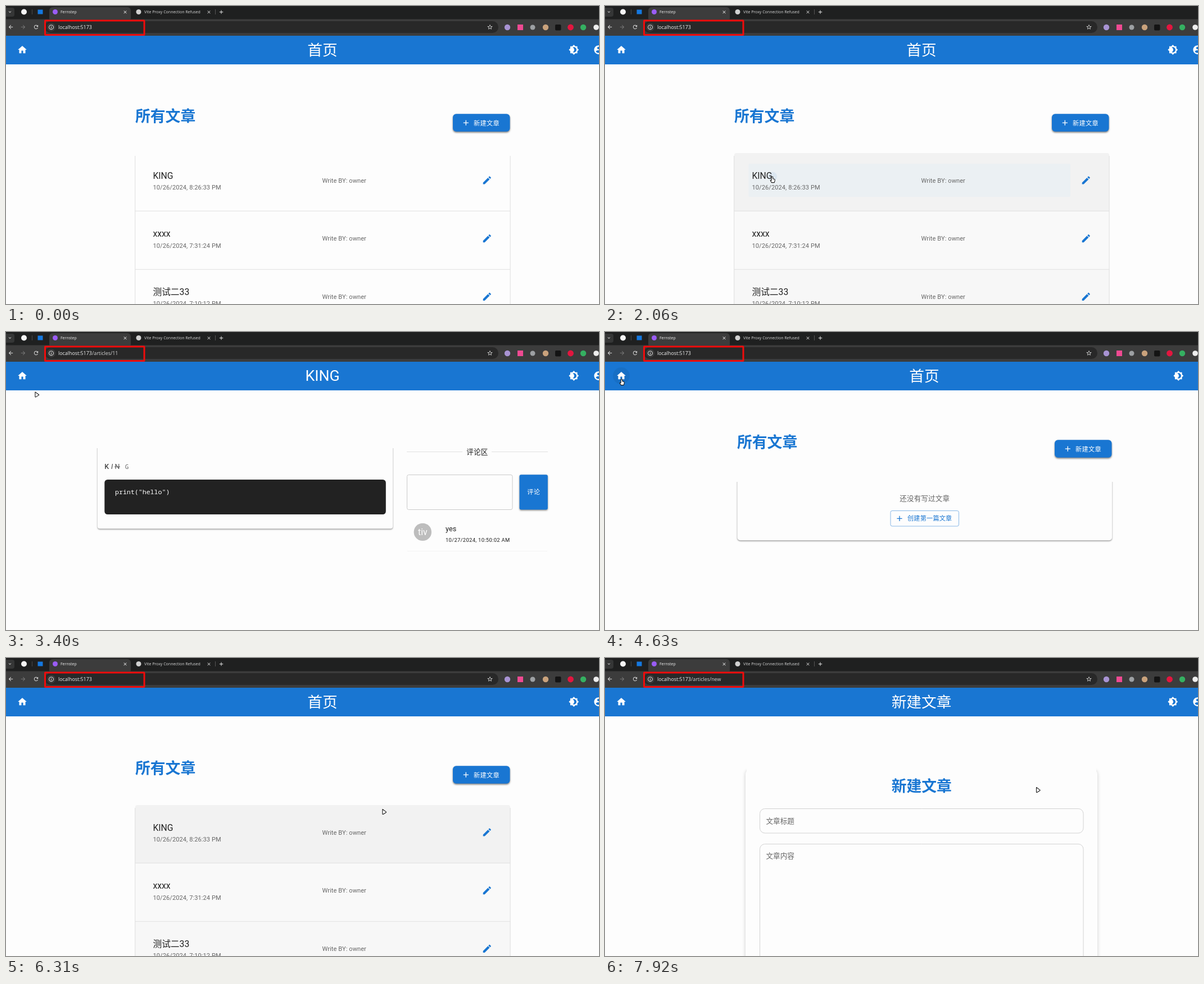
Animation of 1055 by 531 pixels, one loop 8 s. Source, as an HTML page with a canvas:

```html
<!DOCTYPE html>
<html lang="zh">
<head>
<meta charset="utf-8">
<title>Articles</title>
<style>
  html, body { margin: 0; width: 100%; height: 100%; overflow: hidden; background: #fdfdfd; }
  canvas { display: block; }
</style>
</head>
<body>
<canvas id="stage" width="1055" height="531"></canvas>
<script>
const ctx = document.getElementById('stage').getContext('2d');
const LOOP = 8000;
const BLUE = '#1976d2', GREY = '#666', INK = '#212121', PAGE = '#fdfdfd', LINE = '#e0e0e0';
const SANS = 'Roboto, "Noto Sans CJK SC", "Noto Sans CJK JP", sans-serif';
const UI = '"Open Sans", "Noto Sans", sans-serif';
const MONO = '"Noto Sans Mono", "DejaVu Sans Mono", monospace';

// Icons on a 24 unit grid
const ICON = {
  home: 'M10 20v-6h4v6h5v-8h3L12 3 2 12h3v8z',
  theme: 'M20 8.69V4h-4.69L12 .69 8.69 4H4v4.69L.69 12 4 15.31V20h4.69L12 23.31 15.31 20H20v-4.69L23.31 12 20 8.69z' +
    'M12 18c-.89 0-1.74-.2-2.5-.55C11.56 16.5 13 14.42 13 12s-1.44-4.5-3.5-5.45C10.26 6.2 11.11 6 12 6c3.31 0 6 2.69 6 6s-2.69 6-6 6z',
  user: 'M12 2C6.48 2 2 6.48 2 12s4.48 10 10 10 10-4.48 10-10S17.52 2 12 2zm0 3c1.66 0 3 1.34 3 3s-1.34 3-3 3-3-1.34-3-3 1.34-3 3-3z' +
    'm0 14.2c-2.5 0-4.71-1.28-6-3.22.03-1.99 4-3.08 6-3.08 1.99 0 5.97 1.09 6 3.08-1.29 1.94-3.5 3.22-6 3.22z',
  edit: 'M3 17.25V21h3.75L17.81 9.94l-3.75-3.75L3 17.25zM20.71 7.04c.39-.39.39-1.02 0-1.41l-2.34-2.34c-.39-.39-1.02-.39-1.41 0l-1.83 1.83 3.75 3.75 1.83-1.83z',
  add: 'M19 13h-6v6h-2v-6H5v-2h6V5h2v6h6v2z',
  back: 'M20 11H7.83l5.59-5.59L12 4l-8 8 8 8 1.41-1.41L7.83 13H20v-2z',
  next: 'M12 4l-1.41 1.41L16.17 11H4v2h12.17l-5.58 5.59L12 20l8-8z',
  reload: 'M17.65 6.35C16.2 4.9 14.21 4 12 4c-4.42 0-7.99 3.58-7.99 8s3.57 8 7.99 8c3.73 0 6.84-2.55 7.73-6h-2.08c-.82 2.33-3.04 4-5.65 4-3.31 0-6-2.69-6-6s2.69-6 6-6c1.66 0 3.14.69 4.22 1.78L13 11h7V4l-2.35 2.35z',
  info: 'M11 7h2v2h-2zm0 4h2v6h-2zm1-9C6.48 2 2 6.48 2 12s4.48 10 10 10 10-4.48 10-10S17.52 2 12 2zm0 18c-4.41 0-8-3.59-8-8s3.59-8 8-8 8 3.59 8 8-3.59 8-8 8z',
  star: 'M22 9.24l-7.19-.62L12 2 9.19 8.63 2 9.24l5.46 4.73L5.82 21 12 17.27 18.18 21l-1.63-7.03L22 9.24zM12 15.4l-3.76 2.27 1-4.28-3.32-2.88 4.38-.38L12 6.1l1.71 4.04 4.38.38-3.32 2.88 1 4.28L12 15.4z',
  close: 'M19 6.41L17.59 5 12 10.59 6.41 5 5 6.41 10.59 12 5 17.59 6.41 19 12 13.41 17.59 19 19 17.59 13.41 12z',
  down: 'M7.41 8.59L12 13.17l4.59-4.58L18 10l-6 6-6-6z'
};
for (const k in ICON) ICON[k] = new Path2D(ICON[k]);
const HAND = new Path2D('M-1.3.8Q0-.8 1.3.8V3.8L4.4 4.8Q5.2 5.6 4.5 8L3.7 10.6H-1L-3.2 7.2Q-3.4 5.6-1.3 6.8Z');
const ARROW = new Path2D('M0 0L6.6 4.9Q6.8 5.6 5.8 6L1 9Q0 9.2 0 8.4Z');

function icon(name, x, y, size, color, rule = 'evenodd') {
  ctx.save();
  ctx.translate(x - size / 2, y - size / 2);
  ctx.scale(size / 24, size / 24);
  ctx.fillStyle = color;
  ctx.fill(ICON[name], rule);
  ctx.restore();
}

function text(str, x, y, size, color, { weight = 400, align = 'left', font = SANS, gap = 0, style = '' } = {}) {
  ctx.font = `${style} ${weight} ${size}px ${font}`;
  ctx.letterSpacing = gap + 'px';
  ctx.textAlign = align;
  ctx.fillStyle = color;
  ctx.fillText(str, x, y);
}

function rect(x, y, w, h, color) {
  ctx.fillStyle = color;
  ctx.fillRect(x, y, w, h);
}

function round(x, y, w, h, r, fill, stroke, width = 1) {
  ctx.beginPath();
  ctx.roundRect(x, y, w, h, r);
  if (fill) { ctx.fillStyle = fill; ctx.fill(); }
  if (stroke) { ctx.strokeStyle = stroke; ctx.lineWidth = width; ctx.stroke(); }
}

function disc(x, y, r, color) {
  ctx.beginPath();
  ctx.arc(x, y, r, 0, Math.PI * 2);
  ctx.fillStyle = color;
  ctx.fill();
}

function shadow(blur, dy, alpha, draw) {
  ctx.save();
  ctx.shadowColor = `rgba(0,0,0,${alpha})`;
  ctx.shadowBlur = blur;
  ctx.shadowOffsetY = dy;
  draw();
  ctx.restore();
}

// Panel whose upper edge fades into the page
function panel(x, y, w, bottom, r) {
  ctx.save();
  ctx.beginPath();
  ctx.rect(x - 6, y, w + 12, bottom - y + 8);
  ctx.clip();
  shadow(2.5, 1.2, 0.45, () => round(x, y - 6, w, bottom - y + 6, r, PAGE));
  ctx.restore();
}

// Cursor stops: time, x, y
const TRACK = [
  [100, 420, 533], [300, 400, 430], [480, 380, 310], [640, 362, 207], [780, 350, 240], [910, 334, 271],
  [970, 333, 272], [1330, 297.5, 304], [2900, 297.5, 304],
  [3120, 180, 200], [3400, 52, 107], [3560, 36, 92], [3730, 29.5, 84], [4970, 29.5, 84],
  [5130, 70, 112], [5620, 291.5, 275.5], [5800, 346, 315], [5860, 347, 316],
  [5990, 400, 339], [6200, 590, 305], [6450, 770, 225], [6640, 818.5, 207], [7740, 818.5, 207],
  [7840, 795, 220], [7920, 767.5, 230.5], [8000, 767.5, 230.5]
];

function cursorAt(t) {
  const i = TRACK.findIndex(k => k[0] > t);
  if (i <= 0) return { x: -50, y: -50 };
  const [t0, x0, y0] = TRACK[i - 1], [t1, x1, y1] = TRACK[i];
  const k = (t - t0) / (t1 - t0);
  return { x: x0 + (x1 - x0) * k, y: y0 + (y1 - y0) * k };
}

const inside = (p, x, y, w, h) => p.x >= x && p.x < x + w && p.y >= y && p.y < y + h;

function browser(path) {
  rect(0, 0, 1055, 24, '#1f2020');
  rect(0, 23.5, 1055, 29.5, '#3c3c3c');
  round(-4, 3, 19, 16, 4, '#353636');
  icon('down', 7, 10.5, 9, '#eee');
  disc(32, 10.5, 5, '#f4f4f4');
  rect(46, 6, 1, 9, '#484848');
  rect(56.5, 6.5, 9, 8, '#1478e0');
  round(77, 2, 145, 26, 6, '#3c3c3c');
  disc(87.5, 10.5, 4.5, '#9a5cf5');
  text('Fernstep', 97, 13.3, 7, '#eee', { font: UI });
  icon('close', 212, 10.8, 9, '#f2f2f2');
  disc(236, 10.5, 4.5, '#d0d0d0');
  text('Vite Proxy Connection Refused', 246, 13.3, 7, '#d8d8d8', { font: UI });
  icon('close', 361, 10.8, 9, '#ddd');
  rect(372, 6, 1, 9, '#555');
  icon('add', 383, 10.8, 11, '#eee');

  round(69, 27, 807, 21, 10.5, '#282828');
  icon('back', 8.5, 37.5, 11, '#ddd');
  icon('next', 30.5, 37.5, 11, '#777');
  icon('reload', 53.5, 37.5, 11, '#ddd');
  disc(80.5, 37.8, 7.5, '#3a3a3a');
  icon('info', 80.5, 37.8, 10.5, '#eee');
  text('localhost:5173', 93, 41, 8.9, '#f4f4f4', { font: UI });
  text(path, 153, 41, 8.9, '#d6d6d6', { font: UI });
  icon('star', 861, 37.5, 11.5, '#e4e4e4');
  disc(892, 38, 5.2, '#a893d3');
  rect(910, 33, 10, 10, '#ef4a92');
  disc(937, 38, 4.5, '#9da0a3');
  disc(960, 38, 5.2, '#c9a27c');
  round(977, 33, 10.5, 10.5, 2, '#141414');
  disc(1004.5, 38, 5.4, '#e3163f');
  disc(1027, 38, 5.2, '#35b061');
  disc(1050, 38, 4.8, '#eee');

  round(69.5, 26, 176.5, 25.5, 0.5, null, '#f10b0b', 3);
}

function header(title, wide, glow) {
  rect(0, 53, 1055, 51, BLUE);
  if (glow) disc(29, 78, 15, 'rgba(0,0,0,.06)');
  icon('home', 29, 78, 18.9, '#fff');
  text(title, 563 + wide / 2, title === 'KING' ? 87.3 : 88.4, 26.7, '#fff', { align: 'center' });
  icon('theme', 1010.2 + wide, 78, 18.9, '#fff');
  icon('user', 1054.2 + wide, 78, 18.9, '#fff');
}

function listHead(dx, hot) {
  text('所有文章', 230 + dx, 206, 26.8, BLUE, { weight: 700 });
  shadow(hot ? 5 : 3, hot ? 2.5 : 1.6, 0.5, () =>
    round(795 + dx, 192.3, 101.5, 31.5, 6, hot ? '#1565c0' : BLUE));
  icon('add', 818.3 + dx, 208.2, 15.7, '#fff');
  text('新建文章', 832 + dx, 212.6, 11.2, '#fff', { weight: 500, gap: 0.3 });
}

const ROWS = [
  ['KING', '10/26/2024, 8:26:33 PM'],
  ['xxxx', '10/26/2024, 7:31:24 PM'],
  ['测试二33', '10/26/2024, 7:10:12 PM']
];
const PITCH = 103.7, TOP = 262;

function home(t, p) {
  const hot = inside(p, 795, 192, 102, 32);
  listHead(0, hot);
  const seen = [9999, 480, 300];
  ROWS.forEach(([title, date], i) => {
    const y = TOP + i * PITCH, dy = i * PITCH;
    const over = inside(p, 230, y, 667, PITCH);
    const fill = over ? '#f2f2f2' : t > seen[i] ? ['', '#f9f9f9', '#f7f7f7'][i] : PAGE;
    round(230, y, 667, PITCH, i ? 0 : [4, 4, 0, 0], fill);
    const pressed = i === 0 && (t >= 2060 && t < 2130 || t >= 5890 && t < 6400);
    if (over && (pressed || i === 2) && inside(p, 256, y + 19, 572, 59)) {
      round(255.5, y + 19, 572.5, 59, 2, '#ebf0f3');
      if (t >= 2060 && t < 2130) disc(298, 304, 8 + (t - 2060) / 6, 'rgba(25,118,210,.07)');
    }
    if (i) rect(230, Math.floor(y) - 0.2, 667, 1, LINE);
    text(title, 261.5, 307.6 + dy + (i === 2 ? 0.3 : 0), 15.7, INK);
    text(date, 261.5, 327 + dy, 11, GREY, { gap: 0.1 });
    text('Write BY: owner', 562.5, 314.5 + dy, 11, GREY, { gap: 0.1 });
    icon('edit', 855.8, 310.5 + dy, 18.9, BLUE);
  });
  rect(229.2, 267, 1, 264, '#dedede');
  rect(896.6, 267, 1, 264, '#dedede');
  if (t >= 7240 && hot) {
    const r = 4 + (t - 7240) / 12;
    disc(818.5, 208, Math.min(r, 15), 'rgba(255,255,255,.06)');
  }
}

function empty() {
  listHead(5, false);
  panel(235.5, 267, 666.5, 371.3, 5);
  text('还没有写过文章', 568.7, 300.8, 12.6, GREY, { align: 'center', gap: 0.1 });
  round(508, 318.5, 121.5, 27.5, 3, null, 'rgba(25,118,210,.5)');
  icon('add', 524, 332.3, 15.7, BLUE);
  text('创建第一篇文章', 538, 336.3, 11.1, BLUE, { weight: 500, gap: 0.25 });
}

function article(t) {
  panel(163, 207, 525, 350.5, 4);
  text('K', 175.2, 244.2, 12.4, '#444', { weight: 500 });
  text('I', 187, 244.2, 12.4, '#444', { style: 'italic' });
  text('N', 193.5, 244.2, 12.4, '#555');
  rect(193, 239.6, 10, 1, '#555');
  text('G', 211.8, 244.2, 11, GREY, { font: MONO });
  round(175.3, 263, 500.5, 62, 5.5, '#222');
  text('print("hello")', 194, 289, 11.6, '#fff', { font: MONO });

  rect(713, 213, 99, 1, LINE);
  rect(864, 213, 100, 1, LINE);
  text('评论区', 838.3, 218.2, 12.6, INK, { align: 'center', gap: 0.1 });
  round(713.5, 254.5, 187.5, 62, 3, PAGE, '#cacaca');
  shadow(3, 1.4, 0.45, () => round(913.5, 254.2, 50.3, 62.3, 3, BLUE));
  text('评论', 938.8, 289.3, 11.2, '#fff', { align: 'center', weight: 500, gap: 0.3 });
  if (t < 2200) return;
  disc(741.3, 356.4, 15.7, '#bdbdbd');
  text('tiv', 741.3, 361.8, 15.7, '#fff', { align: 'center' });
  text('yes', 782, 354.5, 12.6, INK, { gap: 0.1 });
  text('10/27/2024, 10:50:02 AM', 782, 373.5, 9.43, INK, { gap: 0.31 });
  rect(714, 390, 249, 1, '#f3f3f3');
}

function editor() {
  ctx.save();
  ctx.beginPath();
  ctx.rect(236, 196, 656, 340);
  ctx.clip();
  shadow(6, 1, 0.2, () => round(250, 198, 626, 380, 9, PAGE));
  rect(252, 190, 622, 14, PAGE);
  ctx.restore();
  text('新建文章', 563.3, 237.5, 26.8, BLUE, { weight: 700, align: 'center' });
  round(275.5, 268.5, 575.5, 43.5, 9, null, '#d2d2d2');
  text('文章标题', 286.5, 295.3, 12.6, GREY);
  round(275.5, 331.5, 575.5, 240, 9, null, '#d2d2d2');
  text('文章内容', 286.5, 357.3, 12.6, GREY);
}

function pointer(p, hand) {
  ctx.save();
  ctx.translate(p.x, p.y);
  ctx.lineJoin = 'round';
  ctx.lineWidth = 1.1;
  ctx.strokeStyle = '#1a1a1a';
  ctx.fillStyle = '#fff';
  const shape = hand ? HAND : ARROW;
  ctx.fill(shape);
  ctx.stroke(shape);
  ctx.restore();
}

function view(t) {
  if (t < 2130) return 'home';
  if (t < 4630) return 'article';
  if (t < 4720) return 'empty';
  return t < 7390 ? 'home' : 'editor';
}

const TITLES = { home: '首页', empty: '首页', article: 'KING', editor: '新建文章' };
const PATHS = { home: '', empty: '', article: '/articles/11', editor: '/articles/new' };

function draw(t) {
  const page = view(t), p = cursorAt(t);
  const onHome = inside(p, 16, 65, 27, 27);
  rect(0, 0, 1055, 531, PAGE);
  if (page === 'home') home(t, p);
  else if (page === 'empty') empty();
  else if (page === 'article') article(t);
  else editor();
  header(TITLES[page], page === 'empty' ? 10 : 0, onHome && t >= 4630);
  browser(PATHS[page]);
  const onLink = page === 'home' && (inside(p, 256, 281, 572, 59) || inside(p, 256, 488, 572, 59) || inside(p, 795, 192, 102, 32));
  pointer(p, onHome || onLink);
}

const start = performance.now();
function tick() {
  draw((performance.now() - start) % LOOP);
  requestAnimationFrame(tick);
}
tick();
</script>
</body>
</html>
```
